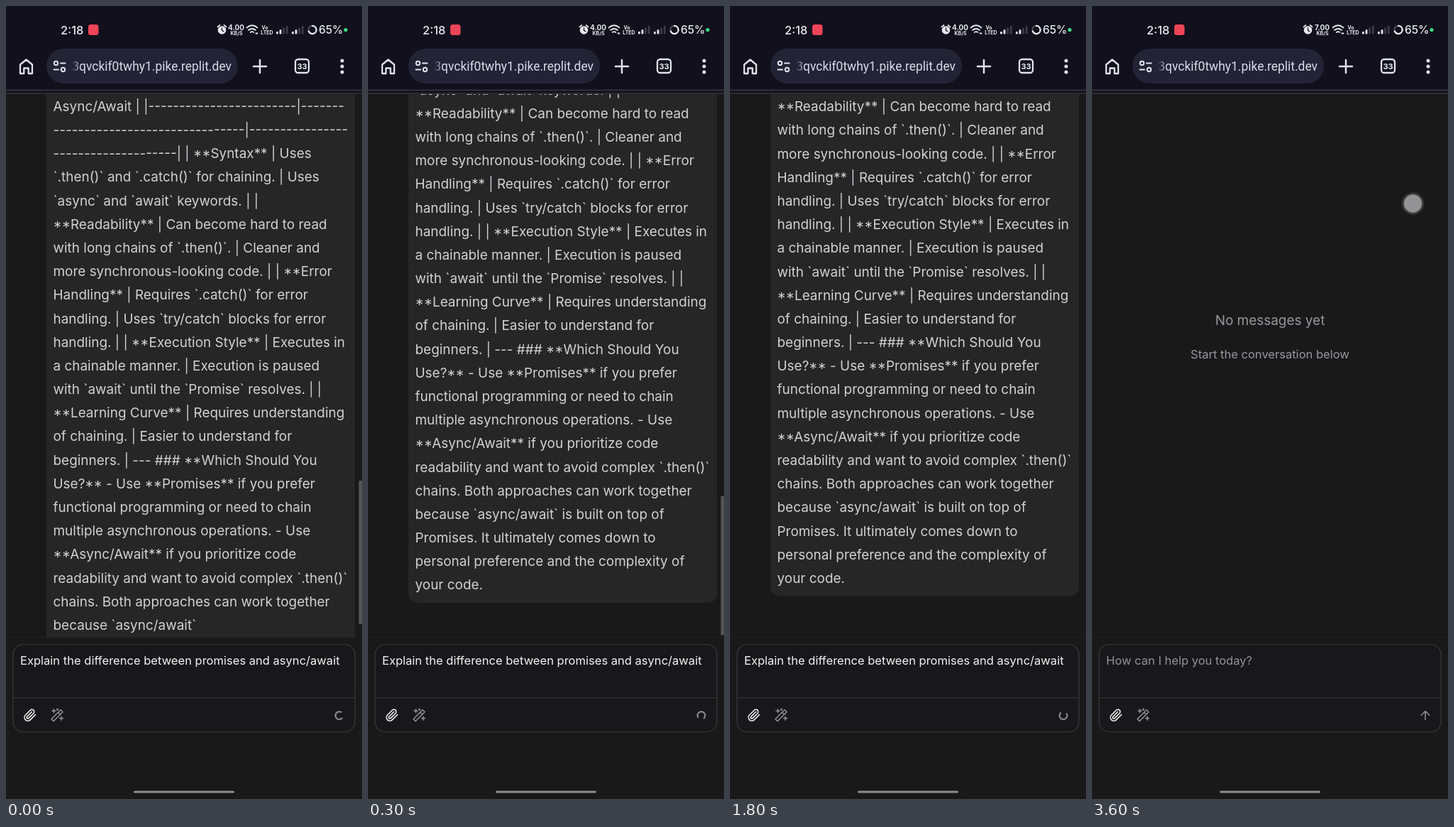
Recreate the animation shown at these times as an HTML page. Size 502 px wide and 1116 px high, loop 3.7 s.

```html
<!DOCTYPE html>
<html lang="en">
<head>
<meta charset="utf-8">
<title>Chat reply</title>
<style>
  html, body { margin: 0; height: 100%; overflow: hidden; background: #19191a; }
  svg { display: block; }
  #stage { width: 100vw; height: 100vh; }
  text { font-family: Inter, sans-serif; }
  .line { fill: none; stroke-linecap: round; stroke-linejoin: round; }
  .body { font-size: 18.95px; }
  .small { font-size: 16.55px; }
  .mid { text-anchor: middle; }
</style>
</head>
<body>
<svg id="stage" viewBox="0 0 502 1116">
  <defs>
    <linearGradient id="fade" gradientUnits="userSpaceOnUse" x1="94" x2="105" y1="0" y2="0">
      <stop stop-color="#d9dbea" stop-opacity=".1"/><stop offset="1" stop-color="#d9dbea"/>
    </linearGradient>
    <radialGradient id="glow">
      <stop offset=".72" stop-color="#777" stop-opacity=".7"/><stop offset="1" stop-color="#555" stop-opacity="0"/>
    </radialGradient>
  </defs>
  <rect width="502" height="1116" fill="#19191a"/>

  <!-- conversation, clipped to its viewport -->
  <svg id="chat" y="124" width="502" height="764" viewBox="0 124 502 764">
    <g id="scroll" class="body" fill="#d2d2d3">
      <rect x="57" y="-100" width="435" height="1096" rx="13" fill="#262627"/>
    </g>
    <rect id="thumb" x="497.5" width="4.5" fill="#555"/>
  </svg>
  <g id="empty" class="mid" fill="#98989c">
    <text class="body" x="251" y="449">No messages yet</text>
    <text class="small" x="251" y="495.5">Start the conversation below</text>
  </g>

  <!-- browser bars -->
  <rect width="502" height="124" fill="#11101c"/>
  <path d="M0 118.5H502" stroke="#3c3b48" stroke-width="1.5"/>
  <path d="M0 123H502" stroke="#2b2a34" stroke-width="2"/>
  <g fill="#e9e9f1" font-weight="500">
    <text x="77" y="39.5" font-size="16.5">2:18</text>
    <text x="441" y="39" font-size="15.5">65%</text>
    <g class="mid" font-weight="700">
      <text id="speed" x="324.5" y="33.5" font-size="10">4.00</text>
      <text x="325" y="40.5" font-size="7">KB/S</text>
      <text x="365" y="33" font-size="7">Vo</text>
      <text x="368" y="40" font-size="7" textLength="">LTED</text>
      <text x="417.5" y="89" font-size="11">33</text>
    </g>
  </g>
  <rect x="116" y="26" width="14.5" height="15" rx="3.5" fill="#ee4457"/>
  <circle cx="479" cy="33.5" r="2.6" fill="#3ddc84"/>
  <circle cx="304.5" cy="34" r="5.8" fill="#e9e9f1"/>
  <path class="line" d="M304.5 31v3.4l2.4 1.3" stroke="#11101c" stroke-width="1.3"/>
  <g class="line" stroke="#e9e9f1" stroke-width="1.7">
    <path d="M298.5 29.5l3-2.5M310.5 29.5l-3-2.5"/>
    <path d="M339.5 30.5q7.500-6.500 15 0M342 34q5-4 10 0M344.700 37q2.300-1.800 4.600 0"/>
    <path d="M352.500 38.500h2" stroke-width="2"/>
  </g>
  <g id="bars"></g>
  <g class="line" stroke-width="2.2">
    <circle cx="432" cy="33.500" r="5.600" stroke="#4a4955"/>
    <path d="M432 27.900a5.600 5.600 0 1 1-5.200 7.600" stroke="#e9e9f1"/>
  </g>
  <rect x="57" y="60" width="270" height="49" rx="24.5" fill="#222436"/>
  <text x="318" y="91" text-anchor="end" fill="url(#fade)" style="font:17.45px Roboto, sans-serif">3qvckif0twhy1.pike.replit.dev</text>
  <g class="line" stroke="#e2e2ee" stroke-width="2.3">
    <path d="M20 82.500L28.500 75.500 37 82.500V95H31.700V87.500H25.300V95H20Z"/>
    <path d="M358 76v18M349 85h18" stroke-width="2.5"/>
    <rect x="408" y="75" width="19" height="19" rx="4"/>
    <path d="M77 80.500h6.500M67.500 89.500H74" stroke-width="2"/>
    <circle cx="70.500" cy="80.500" r="2.700" stroke-width="2"/>
    <circle cx="80.500" cy="89.500" r="2.700" stroke-width="2"/>
    <path d="M474 77v0M474 85v0M474 93v0" stroke-width="5"/>
  </g>

  <!-- prompt box -->
  <path d="M0 888.500H502" stroke="#222224"/>
  <rect x="10" y="898.500" width="482" height="123" rx="14" fill="#18181a" stroke="#383841" stroke-width="1.2"/>
  <path d="M10 973.500H492" stroke="#383841" stroke-width="1.2"/>
  <text id="prompt" class="small" x="20" y="927"></text>
  <path class="line" transform="translate(24.400 988.400) scale(.8)" stroke="#f0f0f0" stroke-width="2"
    d="m21.440 11.050-9.190 9.190a6 6 0 0 1-8.490-8.490l8.570-8.570A4 4 0 1 1 18 8.840l-8.590 8.570a2 2 0 0 1-2.830-2.830l8.490-8.480"/>
  <g class="line" stroke="#98989f" stroke-width="1.4">
    <path d="M64 1003.500L77 990.500l3 3-13 13ZM73.500 994l3 3"/>
    <path d="M67.500 989.500v5M65 992h5M78 1000v5M75.500 1002.500h5M72.500 989v2M71.500 990h2"/>
  </g>
  <path id="arrow" class="line" d="M470 1004.500V992.500M464.200 998.200L470 992.400 475.800 998.200" stroke="#8b8b8f" stroke-width="1.600"/>
  <path id="spinner" d="M473.800 1002.300a5.400 5.400 0 1 1 0-7.600" fill="none" stroke="#87878a" stroke-width="2.200"/>

  <g id="touch">
    <circle cx="452.500" cy="278" r="17" fill="url(#glow)"/>
    <circle cx="452.500" cy="278" r="12.500" fill="#939396"/>
  </g>
  <rect x="180" y="1104.500" width="142" height="3" rx="1.500" fill="#8e8e8f"/>
</svg>
<script>
const LOOP = 3700, STEP = 100, CLEARED = 2000, TOUCHED = 3500;
const FIRST = 147.9, LEADING = 33.18, END = 165.5;
const $ = id => document.getElementById(id);
const dash = n => "-".repeat(n);

const lines = [
  "Async/Await | |" + dash(24) + "|" + dash(7),
  dash(31) + "|" + dash(16),
  dash(20) + "| | **Syntax** | Uses",
  "`.then()` and `.catch()` for chaining. | Uses",
  "`async` and `await` keywords. | |",
  "**Readability** | Can become hard to read",
  "with long chains of `.then()`. | Cleaner and",
  "more synchronous-looking code. | | **Error",
  "Handling** | Requires `.catch()` for error",
  "handling. | Uses `try/catch` blocks for error",
  "handling. | | **Execution Style** | Executes in",
  "a chainable manner. | Execution is paused",
  "with `await` until the `Promise` resolves. | |",
  "**Learning Curve** | Requires understanding",
  "of chaining. | Easier to understand for",
  "beginners. | --- ### **Which Should You",
  "Use?** - Use **Promises** if you prefer",
  "functional programming or need to chain",
  "multiple asynchronous operations. - Use",
  "**Async/Await** if you prioritize code",
  "readability and want to avoid complex `.then()`",
  "chains. Both approaches can work together",
  "because `async/await` is built on top of",
  "Promises. It ultimately comes down to",
  "personal preference and the complexity of",
  "your code."
];

function add(parent, tag, attrs) {
  const el = document.createElementNS("http://www.w3.org/2000/svg", tag);
  for (const key in attrs) el.setAttribute(key, attrs[key]);
  return parent.appendChild(el);
}

const rows = lines.map((line, i) => {
  const row = add($("scroll"), "text", { x: 66.5, y: FIRST + i * LEADING });
  row.textContent = line;
  return row;
});

// two signal meters, two bars lit on each
for (const x of [381, 403])
  for (let i = 0; i < 4; i++)
    add($("bars"), "rect", {
      x: x + i * 4.6, y: 36 - i * 2.7, width: 2.8, height: 3.5 + i * 2.7, rx: .8,
      fill: i < 2 ? "#e9e9f1" : "#3d3c48"
    });

// scroll distance at successive steps
const path = [0, 37, 108, 156, 164, END];
const show = (id, on) => $(id).style.display = on ? "" : "none";

function draw(t) {
  const busy = t < CLEARED, started = t >= STEP;
  const y = path[Math.min(t / STEP, path.length - 1)];

  $("scroll").setAttribute("transform", `translate(0 ${-y})`);
  rows[22].textContent = started ? lines[22] : "because `async/await`";
  $("thumb").setAttribute("y", started ? 659 + .26 * (y - 37) : 668);
  $("thumb").setAttribute("height", started ? 195.5 : 202);
  $("thumb").setAttribute("opacity", Math.max(0, Math.min(1, (1200 - t) / 500)));
  $("spinner").setAttribute("transform", `rotate(${t * .36 - 8} 470 998.5)`);

  show("chat", busy);
  show("spinner", busy);
  show("empty", !busy);
  show("arrow", !busy);
  $("prompt").textContent = busy
    ? "Explain the difference between promises and async/await"
    : "How can I help you today?";
  $("prompt").setAttribute("fill", busy ? "#f2f2f3" : "#92929b");

  show("touch", t >= TOUCHED);
  $("touch").setAttribute("opacity", t > TOUCHED ? 1 : .6);
  $("speed").textContent = t >= TOUCHED ? "7.00" : "4.00";
}

const start = performance.now();
function tick() {
  const t = (performance.now() - start) % LOOP;
  draw(Math.floor(t / STEP) * STEP);
  requestAnimationFrame(tick);
}
tick();
</script>
</body>
</html>
```
